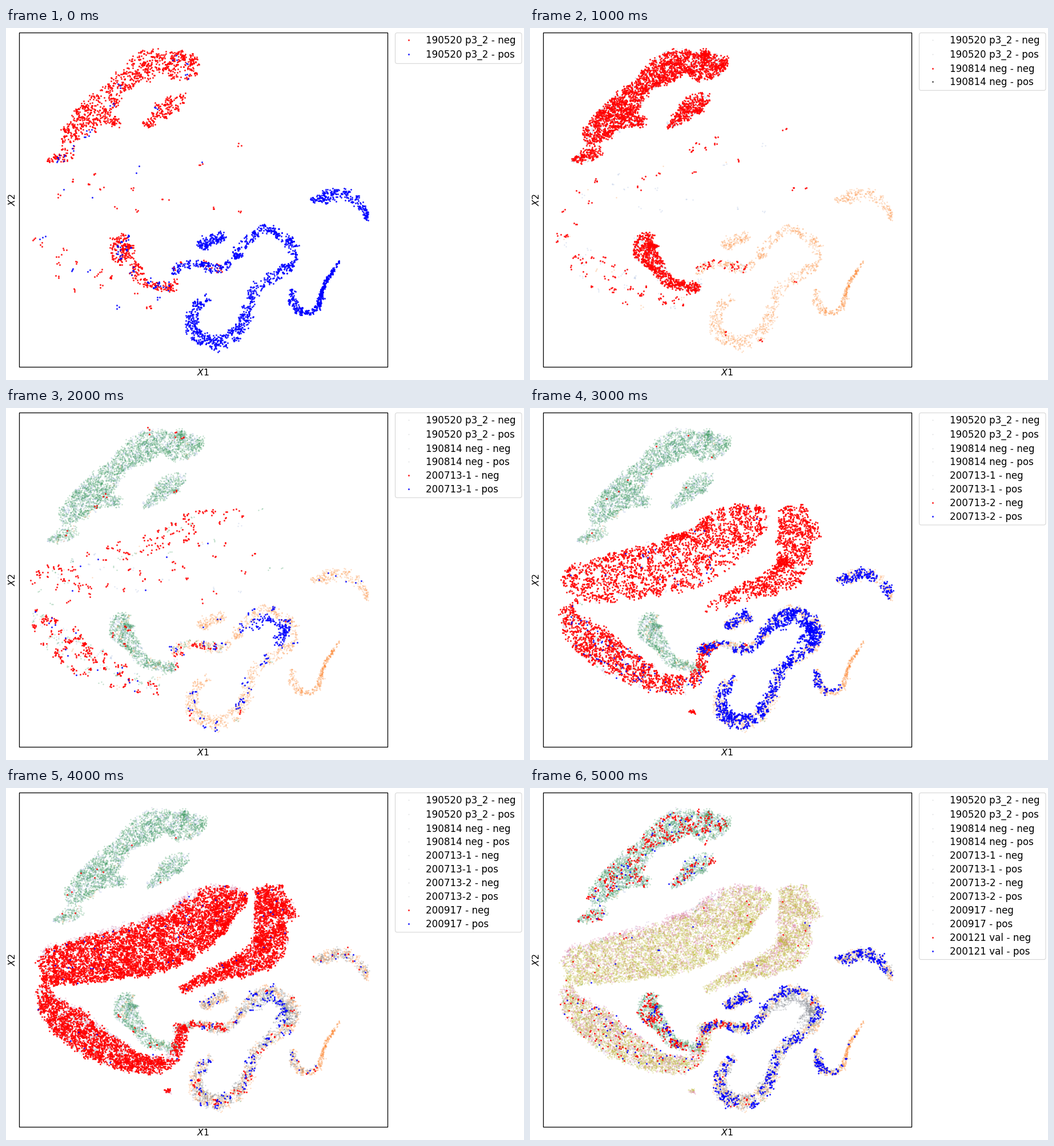
These frames come from a looping animation (907x617 px, 6000 ms). A matplotlib script:

```python
import numpy as np
import matplotlib.pyplot as plt
from matplotlib.animation import FuncAnimation
from matplotlib.patches import FancyBboxPatch, Rectangle

W, H, DPI = 907, 617, 64
PX = 72 / DPI
plt.rcParams["font.family"] = "DejaVu Sans"
plt.rcParams["mathtext.fontset"] = "dejavusans"
rng = np.random.default_rng(7)


def widen(p):
    """Map the plot to the wider data range of the later steps."""
    return p * [0.982, 1] + [11.3, 0]


def narrow(keys):
    keys = np.array(keys, float)
    keys[:, 0] = (keys[:, 0] - 11.3) / 0.982
    return keys


# Each cluster is a smooth spine through a few (x, y, half width) points.
CAP = [(95, 198, 8), (114, 182, 20), (146, 156, 28), (177, 122, 22), (204, 93, 17),
       (237, 69, 28), (277, 59, 19), (306, 67, 30), (345, 60, 6)]
SPUR = [(175, 162, 9), (200, 165, 10)]
FOOT = [(73, 234, 4), (97, 224, 11), (121, 215, 8)]
SIDE = [(239, 173, 5), (262, 155, 11), (287, 134, 18), (314, 123, 8)]
HORN = [(209, 359, 6), (200, 385, 21), (220, 414, 13), (247, 447, 8), (297, 455, 8)]
SNAKE = [(290, 425, 8), (325, 413, 6), (380, 420, 7), (419, 374, 8), (460, 352, 7),
         (504, 385, 8), (487, 422, 9), (440, 455, 9), (405, 530, 10), (365, 553, 12),
         (328, 532, 11), (333, 490, 9), (354, 472, 5)]
BEAN = [(336, 382, 7), (358, 372, 9), (378, 361, 13)]
ARC = [(533, 299, 4), (552, 298, 9), (588, 290, 9), (617, 304, 9), (632, 336, 5)]
HOOK = [(498, 457, 4), (504, 487, 7), (525, 499, 5), (547, 486, 4), (559, 447, 3),
        (584, 408, 1.5)]
SLAB = narrow([(58, 318, 22), (85, 311, 36), (150, 297, 43), (250, 276, 51), (310, 251, 50),
               (365, 209, 45), (420, 187, 8)])
CLAW = narrow([(460, 172, 25), (463, 200, 28), (461, 240, 30), (460, 280, 30),
               (420, 307, 22), (370, 323, 13), (307, 354, 5)])
KNOB = narrow([(487, 197, 8), (502, 230, 9)])
KEEL = narrow([(65, 345, 8), (75, 381, 21), (112, 410, 33), (160, 447, 30), (240, 483, 18),
               (288, 474, 12), (312, 416, 10)])
ISLE = narrow([(280, 534, 4), (286, 530, 4)])
NORTH = [CAP, SPUR, FOOT, SIDE]
HEAD, LOOP = SNAKE[:3], SNAKE[3:7]


def spine(keys):
    """Catmull-Rom curve as rows of x, y, normal x, normal y, half width, area."""
    p = np.array(keys, float)
    p = np.vstack([2 * p[0] - p[1], p, 2 * p[-1] - p[-2]])
    t = np.linspace(0, 1, 60, endpoint=False)[:, None]
    q = np.vstack([b + ((c - a) * t + (2 * a - 5 * b + 4 * c - d) * t**2
                        + (3 * b - a - 3 * c + d) * t**3) / 2
                   for a, b, c, d in zip(p, p[1:], p[2:], p[3:])])
    x, y, w = q.T
    dx, dy = np.gradient(x), np.gradient(y)
    step, w = np.hypot(dx, dy), np.maximum(w, 1)
    return np.c_[x, y, -dy / step, dx / step, w, w * step]


def cloud(n, *shapes, lo=-1, hi=1, skew=1, clump=3):
    """Small clumps of points over the shapes, denser towards side lo when skew > 1."""
    s = np.vstack([spine(k) for k in shapes])
    m = -(-n // clump)
    x, y, nx, ny, w, area = s[rng.choice(len(s), m, p=s[:, 5] / s[:, 5].sum())].T
    off = 0.95 * w * (lo + (hi - lo) * rng.random(m) ** skew)
    seeds = np.c_[x + nx * off, y + ny * off, np.minimum(2.4, 0.3 * w)]
    seeds = np.resize(seeds, (n, 3))
    return seeds[:, :2] + rng.normal(size=(n, 2)) * seeds[:, 2:]


def join(*parts):
    return np.concatenate(parts)


groups = [
    ("190520 p3_2", "#9fb4dc", "#fd8d3c",
     join(cloud(1290, *NORTH), cloud(360, HORN), cloud(50, KEEL), cloud(30, HEAD),
          cloud(32, SLAB), cloud(6, CLAW)),
     join(cloud(1230, SNAKE), cloud(170, BEAN), cloud(270, ARC), cloud(300, HOOK),
          cloud(160, HOOK[3:]), cloud(35, *NORTH), cloud(60, HORN), cloud(14, KEEL),
          cloud(5, SLAB, clump=1))),
    ("190814 neg", "#3c9a5f", "#777777",
     join(cloud(3300, *NORTH), cloud(850, HORN), cloud(110, KEEL), cloud(40, HEAD),
          cloud(50, SLAB, skew=1.6), cloud(10, SNAKE), cloud(8, CLAW)),
     np.empty((0, 2))),
    ("200713-1", "#b9a6d6", "#a9a9b4",
     join(cloud(250, SLAB, skew=2), cloud(290, KEEL, clump=5), cloud(30, HEAD),
          cloud(10, CLAW), cloud(20, *NORTH), cloud(12, HORN), cloud(10, SNAKE)),
     join(cloud(150, LOOP, lo=0.9, hi=3), cloud(120, SNAKE), cloud(9, BEAN, ARC, clump=1),
          cloud(18, KEEL, clump=1), cloud(6, SLAB, clump=1))),
    ("200713-2", "#d9709f", "#7c8288",
     join(cloud(2600, SLAB, skew=1.4), cloud(1400, CLAW, KNOB, lo=1, hi=-1, skew=1.2),
          cloud(1450, KEEL), cloud(20, ISLE), cloud(30, HEAD), cloud(9, *NORTH, clump=1)),
     join(cloud(1250, SNAKE, lo=-0.7, hi=1.3), cloud(300, LOOP, lo=0.8, hi=3),
          cloud(120, BEAN), cloud(210, ARC), cloud(80, HOOK[:4]),
          cloud(25, SLAB, clump=1), cloud(70, KEEL, clump=1))),
    ("200917", "#bfbb3a", "#8a8a9a",
     join(cloud(5900, SLAB, lo=1, hi=-0.9, skew=1.2), cloud(2500, CLAW, KNOB),
          cloud(2500, KEEL, lo=1, hi=-0.9, skew=1.1), cloud(20, ISLE), cloud(80, SNAKE),
          cloud(100, HEAD), cloud(14, HORN), cloud(14, ARC, HOOK[:4], clump=1),
          cloud(11, *NORTH, clump=1)),
     join(cloud(130, SNAKE, hi=1.3), cloud(70, LOOP, lo=0.8, hi=3),
          cloud(30, BEAN, ARC, HOOK[:4], clump=1), cloud(60, SLAB, KEEL, CLAW, clump=1))),
    ("200121 val", "red", "blue",
     join(cloud(420, *NORTH), cloud(180, HORN), cloud(100, KEEL, clump=1), cloud(50, HEAD),
          cloud(20, SNAKE), cloud(22, SLAB, CLAW, clump=1)),
     join(cloud(570, SNAKE), cloud(105, BEAN), cloud(170, ARC), cloud(85, HOOK[:4]),
          cloud(8, HOOK[3:]), cloud(50, *NORTH, clump=1), cloud(40, HORN),
          cloud(36, KEEL, clump=1), cloud(9, SLAB, CLAW, clump=1))),
]

fig = plt.figure(figsize=(W / DPI, H / DPI), dpi=DPI, facecolor="white")
ax = fig.add_axes([0, 0, 1, 1])
ax.set_xlim(0, W)
ax.set_ylim(H, 0)
ax.axis("off")


def dots():
    return ax.plot([], [], "o", mew=0, ls="none")[0]


def style(line, color, size, alpha):
    line.set_color(color)
    line.set_markersize(size * PX)
    line.set_alpha(alpha)


ax.add_patch(Rectangle((22.5, 7.5), 645, 586, fill=False, ec="black", lw=1.3 * PX, zorder=5))
ax.text(345.5, 604, "$X1$", size=15.7 * PX, ha="center", va="center")
ax.text(11, 301.5, "$X2$", size=15.7 * PX, ha="center", va="center", rotation=90)
box = FancyBboxPatch((681.5, 8.5), 221.5, 54, boxstyle="round,pad=0,rounding_size=3.5",
                     fc="white", ec="#d6d6d6", lw=1.1 * PX, zorder=1)
ax.add_patch(box)

rows = [21, 45.7] + [70.5 + 23.9 * i for i in range(10)]
clouds = [dots() for _ in rows]
keys = [dots() for _ in rows]
labels = []
for j, y in enumerate(rows):
    keys[j].set_data([705], [y])
    label = f"{groups[j // 2][0]} - {('neg', 'pos')[j % 2]}"
    labels.append(ax.text(735, y + 6.1, label, size=16.8 * PX, va="baseline"))


def update(k):
    for j in range(len(rows)):
        g, side = divmod(j, 2)
        for item in (clouds[j], keys[j], labels[j]):
            item.set_visible(g <= k)
        pts = groups[g][3 + side]
        clouds[j].set_data(*(widen(pts) if k >= 3 else pts).T)
        if g == k:
            color = ("red", "blue")[side]
            style(clouds[j], color, 3.1, 0.8)
            style(keys[j], color if len(pts) else "#444444", 3.1, 0.8)
        else:
            style(clouds[j], groups[g][1 + side], 2.4, 0.32)
            style(keys[j], "#808890", 2, 0.25)
    bottom = 62.3 if k == 0 else rows[2 * k + 1] + 15
    box.set_height(bottom - 8.5)
    return clouds + keys + labels + [box]


anim = FuncAnimation(fig, update, frames=6, interval=1000, init_func=lambda: update(0),
                     repeat=True, repeat_delay=0, blit=False)
plt.show()
```
